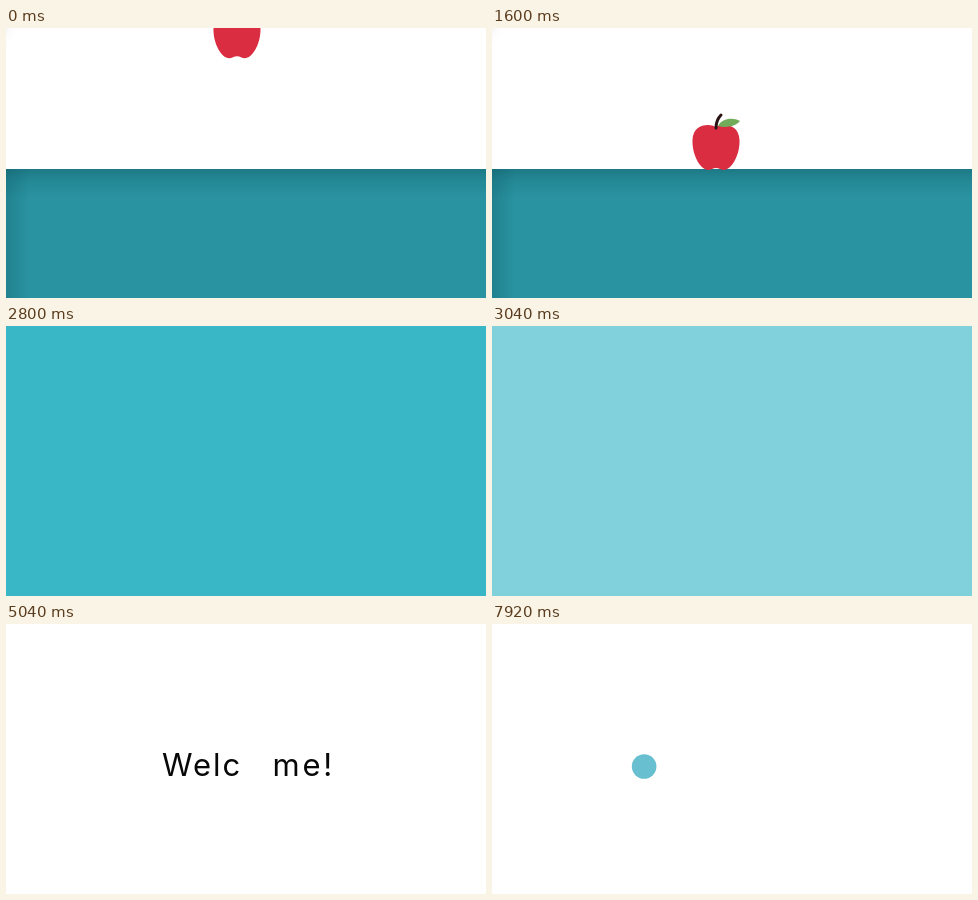
These frames come from a looping animation (480 px wide and 270 px high, 8 s). An HTML page:

```html
<!DOCTYPE html>
<html lang="en">
<head>
<meta charset="utf-8">
<title>Find your Apple!</title>
<style>
  html, body { margin: 0; width: 100%; height: 100%; overflow: hidden; background: #fff; }
  svg { display: block; width: 100%; height: 100%; }
  text { font: 400 31px Inter, "Open Sans", sans-serif; fill: #080808; }
  .bold { font-weight: 800; fill: #d4322f; }
</style>
</head>
<body>
<svg viewBox="0 0 480 270">
  <defs>
    <linearGradient id="down" x2="0" y2="1">
      <stop offset="0" stop-color="#064b56" stop-opacity=".36"/>
      <stop offset=".4" stop-color="#064b56" stop-opacity=".15"/>
      <stop offset="1" stop-color="#064b56" stop-opacity="0"/>
    </linearGradient>
    <linearGradient id="side">
      <stop offset="0" stop-color="#064b56" stop-opacity=".24"/>
      <stop offset="1" stop-color="#064b56" stop-opacity="0"/>
    </linearGradient>
    <filter id="soft" x="-20%" y="-20%" width="140%" height="140%">
      <feGaussianBlur stdDeviation="11"/>
    </filter>
  </defs>

  <g id="scene">
    <rect width="480" height="270" fill="#fff"/>
    <rect y="141" width="480" height="129" fill="#2a93a1"/>
    <rect y="141" width="480" height="30" fill="url(#down)"/>
    <rect y="141" width="24" height="129" fill="url(#side)"/>
    <g id="apple">
      <path fill="#da2d42" d="M0-43C-7-47-23-46-23.5-30C-24-14-15 0-8 0C-5 0-3-2 0-2C3-2 5 0 8 0C15 0 24-14 23.5-30C23-46 7-47 0-43Z"/>
      <path fill="#72ab5a" d="M2-44C6-52 17-53 24-49C19-43 9-42 2-44Z"/>
      <path fill="none" stroke="#2a1214" stroke-width="3" stroke-linecap="round" d="M0-42Q0-50 5-55"/>
    </g>
    <g id="disc">
      <circle cx="7" cy="3" r="291" opacity=".42" filter="url(#soft)"/>
      <circle r="291" fill="#3ab7c6"/>
    </g>
  </g>
  <rect id="veil" width="480" height="270" fill="#fff"/>

  <g id="find">
    <text x="165.3" y="135.5" letter-spacing="1.4">Find your</text>
    <text x="190.3" y="167.5"><tspan class="bold">Apple</tspan>!</text>
  </g>
  <g id="welcome" letter-spacing="2">
    <text x="156" y="152">Welc</text>
    <text x="266.5" y="152" letter-spacing="2.8">me!</text>
  </g>
  <circle id="badge" r="12.3" fill="#68bfd0"/>
</svg>
<script>
  const LOOP = 8000;
  const $ = id => document.getElementById(id);
  const [scene, apple, disc, veil, find, welcome, badge] =
    ['scene', 'apple', 'disc', 'veil', 'find', 'welcome', 'badge'].map($);

  const ramp = (t, a, b) => Math.min(1, Math.max(0, (t - a) / (b - a)));
  const inOut = u => u < .5 ? 4 * u ** 3 : 1 - 4 * (1 - u) ** 3;
  const out = u => 1 - (1 - u) ** 3;
  const mix = (a, b, u) => a + (b - a) * u;
  const place = (el, x, y, s = 1) =>
    el.setAttribute('transform', `translate(${x} ${y}) scale(${s})`);
  const fade = (el, o) => el.setAttribute('opacity', o);

  // Height above the table: a fall, then bounces of halving length
  const GRAVITY = .0014;
  function height(t) {
    if (t < 320) return 112 - .126 * t - GRAVITY / 2 * t * t;
    let start = 320;
    for (let span = 480; span > 50; span /= 2) {
      const s = t - start;
      if (s < span) return GRAVITY / 2 * s * (span - s);
      start += span;
    }
    return 0;
  }

  function draw(t) {
    place(apple, mix(231, 224, out(ramp(t, 0, 1300))), 142 - height(t));

    const slide = inOut(ramp(t, 1745, 2640));
    place(disc, mix(-272, 240, slide), mix(-153, 135, slide));

    const white = ramp(t, 2870, 3350);
    fade(veil, white);
    scene.style.display = white < 1 ? '' : 'none';

    fade(find, ramp(t, 3290, 3950) * (1 - ramp(t, 4080, 4560)));
    fade(welcome, ramp(t, 4560, 5030) * (1 - ramp(t, 6050, 7020)));

    const pop = out(ramp(t, 5130, 6000));
    place(badge, mix(251, 150.8, inOut(ramp(t, 6900, 8100))), 142.5, pop);
    fade(badge, pop);
  }

  const begin = performance.now();
  function tick() {
    draw((performance.now() - begin) % LOOP);
    requestAnimationFrame(tick);
  }
  draw(0);
  requestAnimationFrame(tick);
</script>
</body>
</html>
```
